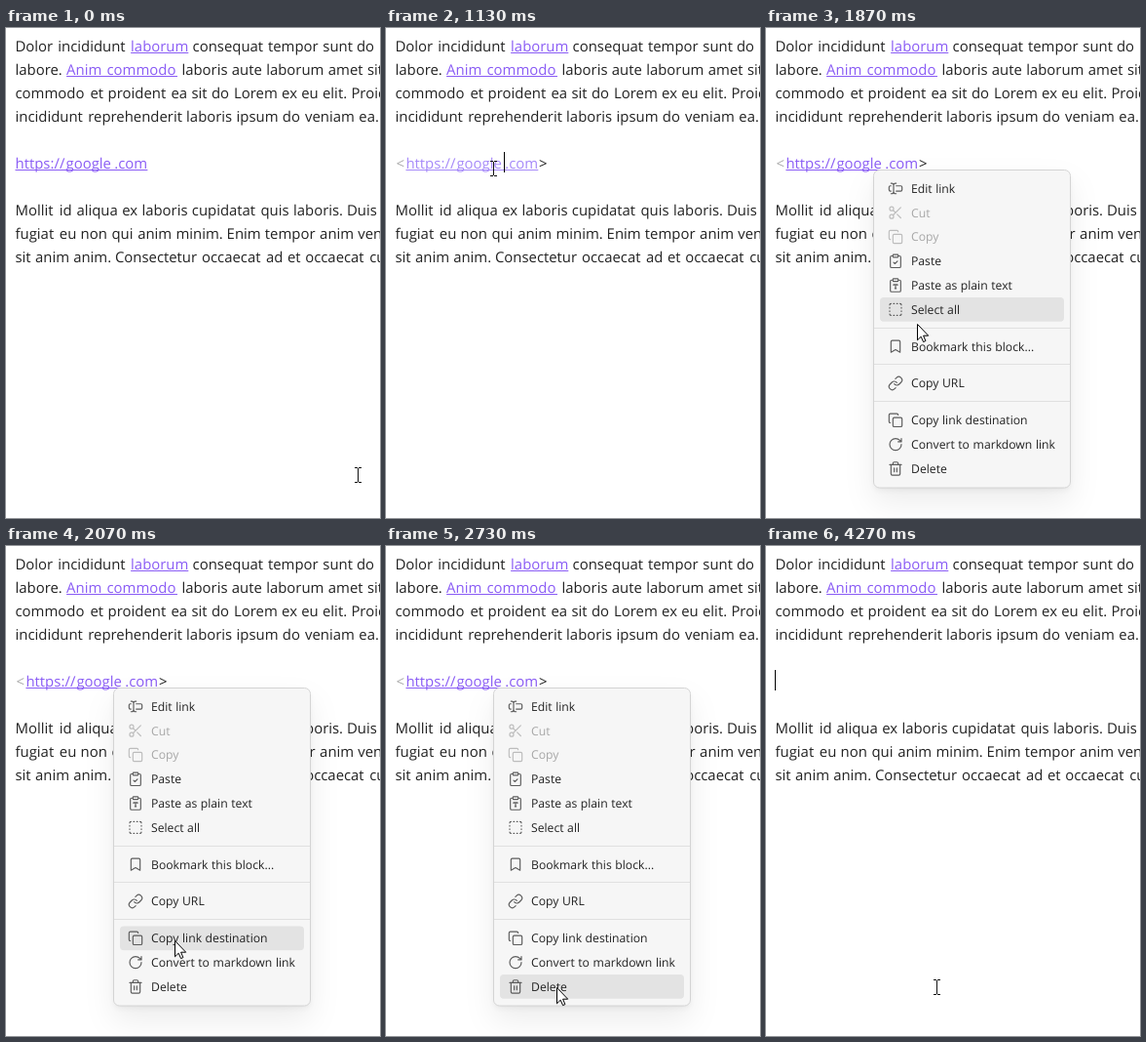
Write an HTML page that moves like this. It is 384x502 px and loops after 4.54 s.

```html
<!DOCTYPE html>
<html lang="en">
<head>
<meta charset="utf-8">
<title>Link context menu</title>
<style>
  html, body { margin: 0; width: 100%; height: 100%; overflow: hidden; background: #fff; }
  svg { display: block; }
  text { font-family: "Open Sans", "Noto Sans", sans-serif; fill: #222; text-rendering: geometricPrecision; }
  #page text { font-size: 14.9px; }
  #menu text { font-size: 12.2px; word-spacing: .4px; }
  .link { fill: #8a5cf5; }
  .link.hover { fill: #a68af9; }
  .link text, tspan.link { fill: inherit; }
  tspan.link { fill: #8a5cf5; }
  .icon { fill: none; stroke: #5c5c5c; stroke-width: 1.75; stroke-linecap: round; stroke-linejoin: round; }
  .off { opacity: .37; }
  .panel { fill: #f6f6f6; stroke: #d4d4d4;
    filter: drop-shadow(0 1px 1px rgba(0,0,0,.028)) drop-shadow(0 3.4px 3.3px rgba(0,0,0,.042)) drop-shadow(0 15px 15px rgba(0,0,0,.07)); }
  .pointer { fill: #fff; stroke: #000; stroke-linejoin: round; }
  #beam { fill: none; stroke: #111; }
</style>
</head>
<body>
<svg id="stage" width="384" height="502" viewBox="0 0 384 502">
  <g id="page"></g>
  <g id="url" class="link">
    <text y="144"></text>
    <rect y="145" x="0" width="135.9" height="1"/>
  </g>
  <g id="marks" style="font-size:14.9px">
    <text x="10.5" y="144" style="fill:#ababab">&lt;</text>
    <text x="156.9" y="144">&gt;</text>
  </g>
  <rect id="caret" y="127" width="1" height="21" fill="#000"/>
  <g id="menu">
    <rect class="panel" x="110.5" y="145.5" width="202" height="325.5" rx="6"/>
    <rect id="glow" x="117" width="189" height="24.8" rx="4" fill="#e3e3e3"/>
    <g id="items"></g>
  </g>
  <g id="cursor">
    <path id="beam" d="M-3-7.5H0M1-7.5H4M-3 7.5H0M1 7.5H4M.5-7V7"/>
    <path id="hand" class="pointer" d="M-1.5 13V1.5a1.5 1.5 0 0 1 3 0V7.5c0-1.4 3-1.4 3 .3c0-1.2 2.8-1 2.8.7c0-1 2.7-.8 2.7.9V14c0 2-1.5 3.5-1.5 5v2.5H-1.5v-2C-2.5 17-4.5 14.5-5.3 12.5c-.8-1.8 1-3 2.2-1.7Z"/>
    <path id="arrow" class="pointer" d="M.5.5V16.8L4.2 13.2 6.6 18.6 8.9 17.6 6.6 12.2H11.7Z"/>
  </g>
</svg>
<script>
const LOOP = 4540, ROW = 24.8, LINE = 24;
const $ = id => document.getElementById(id);

// Each line: row, words ("_" marks a link), start of each word.
const lines = [
  [0, 'Dolor incididunt _laborum consequat tempor sunt do', [9.5, 53.3, 128.1, 191.6, 269, 325.3, 360]],
  [1, 'labore. _Anim _commodo laboris aute laborum amet sit', [9.5, 62.1, 103.5, 180.4, 231.8, 267.2, 330.8, 370.9]],
  [2, 'commodo et proident ea sit do Lorem ex eu elit. Proident', [9.5, 86.4, 104.6, 169.5, 190.4, 210.9, 234.1, 283.1, 303.2, 325, 354.4]],
  [3, 'incididunt reprehenderit laboris ipsum do veniam ea.', [9.5, 84.3, 185.1, 236.5, 283.8, 307, 362.3]],
  [7, 'Mollit id aliqua ex laboris cupidatat quis laboris. Duis', [9.5, 54.7, 72.4, 119.3, 139.4, 190.8, 261.5, 295, 349.9]],
  [8, 'fugiat eu non qui anim minim. Enim tempor anim veniam', [9.5, 54.8, 76.6, 108.5, 135.2, 174.4, 226.6, 265.8, 322.1, 361.3]],
  [9, 'sit anim anim. Consectetur occaecat ad et occaecat cupidatat', [9.5, 30, 69.2, 111.9, 201, 267, 289, 307.2, 373.2]],
];

const word = (w, x) => w[0] === '_'
  ? `<tspan class="link" x="${x}">${w.slice(1)}</tspan>`
  : `<tspan x="${x}">${w}</tspan>`;
const underline = (x, y, w) => `<rect class="link" x="${x}" y="${y}" width="${w}" height="1"/>`;

$('page').innerHTML = lines.map(([row, words, xs]) =>
  `<text y="${24 + row * LINE}">${words.split(' ').map((w, i) => word(w, xs[i])).join(' ')}</text>`
).join('') + underline(128.1, 25, 59.2) + underline(62.1, 49, 113.9);

$('url').querySelector('text').innerHTML =
  word('https', 0) .replace('<tspan', '<tspan') + word('://', 36.1) + word('google', 52) + word('.com', 101.8);
$('url').querySelector('text').style.cssText = 'font-size:14.9px;fill:inherit';

const clipboard = 'M9 2h6a1 1 0 0 1 1 1v2a1 1 0 0 1-1 1H9a1 1 0 0 1-1-1V3a1 1 0 0 1 1-1zM16 4h2a2 2 0 0 1 2 2v14a2 2 0 0 1-2 2H6a2 2 0 0 1-2-2V6a2 2 0 0 1 2-2h2';
const ring = y => `M9 ${y}a3 3 0 1 1-6 0a3 3 0 1 1 6 0`;
const icons = {
  edit: 'M5 4h1a3 3 0 0 1 3 3 3 3 0 0 1 3-3h1M13 20h-1a3 3 0 0 1-3-3 3 3 0 0 1-3 3H5M5 16H4a2 2 0 0 1-2-2v-4a2 2 0 0 1 2-2h1M13 8h7a2 2 0 0 1 2 2v4a2 2 0 0 1-2 2h-7M9 7v10',
  cut: ring(6) + ring(18) + 'M20 4 8.12 15.88M14.47 14.48 20 20M8.12 8.12 12 12',
  copy: 'M10 8h10a2 2 0 0 1 2 2v10a2 2 0 0 1-2 2H10a2 2 0 0 1-2-2V10a2 2 0 0 1 2-2zM4 16c-1.1 0-2-.9-2-2V4c0-1.1.9-2 2-2h10c1.1 0 2 .9 2 2',
  paste: clipboard + 'm1 10 2 2 4-4',
  plain: clipboard + 'M9 12v-1h6v1M11 17h2M12 11v6',
  select: 'M5 3a2 2 0 0 0-2 2M19 3a2 2 0 0 1 2 2M21 19a2 2 0 0 1-2 2M5 21a2 2 0 0 1-2-2M9 3h1M9 21h1M14 3h1M14 21h1M3 9v1M21 9v1M3 14v1M21 14v1',
  bookmark: 'm19 21-7-4-7 4V5a2 2 0 0 1 2-2h10a2 2 0 0 1 2 2z',
  link: 'M10 13a5 5 0 0 0 7.54.54l3-3a5 5 0 0 0-7.07-7.07l-1.72 1.71M14 11a5 5 0 0 0-7.54-.54l-3 3a5 5 0 0 0 7.07 7.07l1.71-1.71',
  convert: 'M21 12a9 9 0 1 1-9-9c2.52 0 4.93 1 6.74 2.74L21 8M21 3v5h-5',
  trash: 'M3 6h18M19 6v14c0 1-1 2-2 2H7c-1 0-2-1-2-2V6M8 6V4c0-1 1-2 2-2h4c1 0 2 1 2 2v2M10 11v6M14 11v6',
};
const entries = [
  ['edit', 'Edit link'], ['cut', 'Cut', 'off'], ['copy', 'Copy', 'off'], ['paste', 'Paste'],
  ['plain', 'Paste as plain text'], ['select', 'Select all'], null,
  ['bookmark', 'Bookmark this block...'], null,
  ['link', 'Copy URL'], null,
  ['copy', 'Copy link destination'], ['convert', 'Convert to markdown link'], ['trash', 'Delete'],
];

const tops = [];
let top_ = 152, items = '';
for (const entry of entries) {
  if (!entry) {
    items += `<rect x="111" y="${Math.round(top_ + 5.7)}" width="201" height="1" fill="#e0e0e0"/>`;
    top_ += 13;
    continue;
  }
  const [icon, label, state = ''] = entry;
  const mid = top_ + ROW / 2;
  items += `<g class="${state}"><path class="icon" transform="translate(125 ${mid - 8}) scale(.6667)" d="${icons[icon]}"/>` +
    `<text x="149" y="${Math.round(mid + 4.4)}">${label}</text></g>`;
  tops.push(top_);
  top_ += ROW;
}
$('items').innerHTML = items;

// Pointer stops: time, x, y. Each holds until the next.
const moves = [
  [0, 361, 458], [70, 357, 452], [130, 338, 424], [200, 300, 372], [270, 252, 310],
  [330, 204, 250], [400, 165, 202], [470, 138, 168], [530, 122, 149],
  [600, 115, 146], [670, 112, 145], [730, 110, 144],
  [1600, 114, 154], [1670, 121, 185], [1730, 133, 225], [1800, 146, 268], [1870, 155, 303],
  [1930, 165, 347], [2000, 171, 388], [2070, 173, 404],
  [2130, 173, 420], [2200, 173, 434], [2270, 173, 442], [2330, 174, 447], [2400, 175, 450], [2470, 175, 452],
];
const shapes = [[0, 'beam'], [530, 'hand'], [1130, 'beam'], [1600, 'arrow'], [3070, 'beam']];
const carets = [[0, 0], [1070, 1], [1670, 0], [2200, 1], [2730, 0], [3200, 1], [3730, 0], [4270, 1]];

const at = (steps, t) => steps.findLast(s => s[0] <= t);
const show = (id, on) => { $(id).style.display = on ? '' : 'none'; };
const within = (t, a, b) => t >= a && t < b;

function draw(t) {
  const [, x, y] = at(moves, t);
  const shape = at(shapes, t)[1];
  const editing = within(t, 1070, 3070);

  $('cursor').setAttribute('transform', `translate(${x} ${y})`);
  for (const id of ['beam', 'hand', 'arrow']) show(id, id === shape);

  show('url', t < 3070);
  $('url').setAttribute('transform', `translate(${editing ? 20.4 : 9.5} 0)`);
  $('url').setAttribute('class', within(t, 600, 1600) ? 'link hover' : 'link');
  show('marks', editing);

  show('caret', at(carets, t)[1]);
  $('caret').setAttribute('x', t < 3070 ? 121 : 9);

  show('menu', within(t, 1200, 3070));
  const hovered = tops.findLast(v => v <= y);
  show('glow', hovered !== undefined && x >= 117);
  if (hovered !== undefined) $('glow').setAttribute('y', hovered);
}

// Let the address inherit its group's colour.
$('url').querySelectorAll('tspan').forEach(s => s.removeAttribute('class'));

const start = performance.now();
function tick() {
  draw((performance.now() - start) % LOOP);
  requestAnimationFrame(tick);
}
tick();
</script>
</body>
</html>
```
